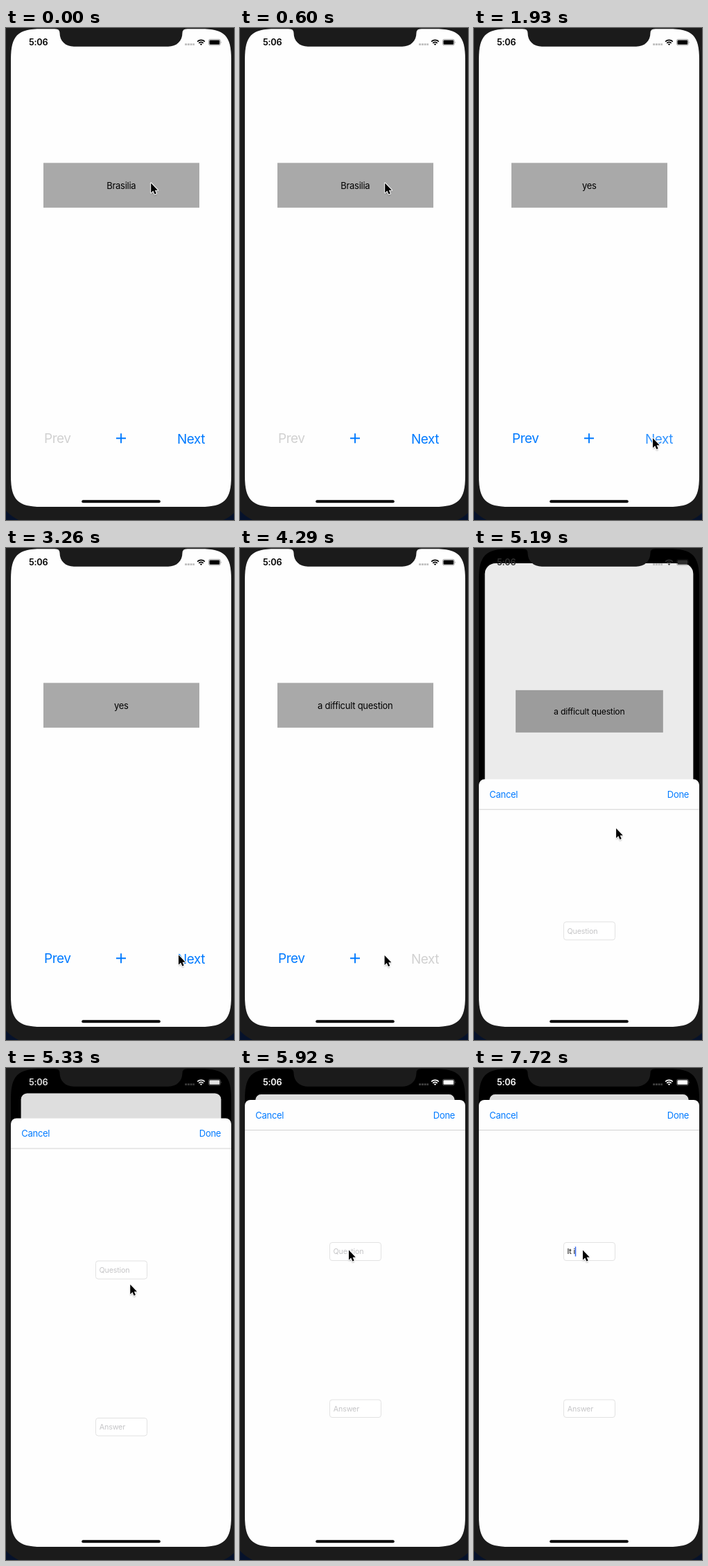
These frames come from a looping animation (329 by 709 pixels, 8 s). An HTML page:

```html
<!DOCTYPE html>
<html lang="en">
<head>
<meta charset="utf-8">
<title>Flashcards</title>
<style>
  html, body { margin: 0; width: 100%; height: 100%; overflow: hidden; background: #06122b; }
  svg { display: block; width: 329px; height: 709px; }
  text { font-family: Inter, Roboto, sans-serif; font-size: 13px; letter-spacing: -.02em; white-space: pre; }
  .mid { text-anchor: middle; }
  .btn { font-size: 19px; letter-spacing: -.5px; }
  .blue { fill: #007aff; }
  .field { font-size: 10.75px; letter-spacing: -.015em; }
  .box { fill: #fff; stroke: #e2e2e2; }
</style>
</head>
<body>
<svg viewBox="0 0 329 709">
  <defs>
    <clipPath id="screen">
      <path d="M7 45C7 11 17 1.300 51 1.300H281C315 1.300 325 11 325 45V646C325 680 315 690 281 690H51C17 690 7 680 7 646Z"/>
    </clipPath>
    <filter id="soft" x="-50%" y="-50%" width="200%" height="200%"><feGaussianBlur stdDeviation="1"/></filter>
    <path id="arrow" d="M0 0V14L3.200 11 5.400 16 7.700 15 5.600 10.200H9.800Z"/>
  </defs>
  <rect x="-12" y="-60" width="356" height="773" rx="50" fill="#1b1b1b"/>

  <g clip-path="url(#screen)">
    <rect width="329" height="709"/>
    <g id="page">
      <rect id="paper" x="7" y="1" width="318" height="689" fill="#fefefe"/>
      <rect id="card" x="54" y="194.400" width="225" height="64.500"/>
      <text id="label" class="mid" x="166.300" y="231.500"></text>
      <text id="prev" class="btn" x="55" y="598.200">Prev</text>
      <path id="plus" d="M159 591.300H173M166 584.300V598.300" stroke="#007aff" stroke-width="1.900"/>
      <text id="next" class="btn" x="247" y="599.200">Next</text>
      <rect id="dim" x="7" y="1" width="318" height="689"/>
    </g>
    <g id="sheet">
      <rect x="7" y="46" width="318" height="720" rx="8" fill="#fefefe"/>
      <path d="M7 89.500H325" stroke="#d2d2d2"/>
      <text class="blue" x="22.200" y="72.500">Cancel</text>
      <text class="blue" x="310.200" y="72.500" text-anchor="end">Done</text>
      <rect class="box" x="129.500" y="251.500" width="74" height="26" rx="3.500"/>
      <text id="entry" class="field" x="134.400" y="268.300"></text>
      <rect id="caret" y="257.500" width="1.500" height="14" fill="#3568f0"/>
      <rect class="box" x="129.500" y="478" width="74" height="25.500" rx="3.500"/>
      <text class="field" x="134.700" y="494.900" fill="#c5c5c7">Answer</text>
    </g>
  </g>

  <path d="M70 0V1Q77.500 1 77.500 7C77.500 19 86 26.700 98 26.700H234C246 26.700 254.500 19 254.500 7Q254.500 1 262 1V0Z" fill="#1b1b1b"/>
  <g id="status">
    <text x="33" y="25.100" font-weight="600" style="font-size: 12.700px">5:06</text>
    <path d="M258.200 23.600H272" stroke="currentColor" stroke-width="2.800" stroke-dasharray="2.900 .850" opacity=".25"/>
    <path d="M276.200 19.600A7.500 7.500 0 0 1 286.800 19.600M278.300 21.800A4.500 4.500 0 0 1 284.700 21.800"
      fill="none" stroke="currentColor" stroke-width="1.700"/>
    <path d="M279.800 23.300A2.400 2.400 0 0 1 283.200 23.300L281.500 25Z"/>
    <rect x="292.400" y="16.300" width="17" height="8.600" rx="2.300" fill="none" stroke="currentColor" stroke-width=".800" opacity=".4"/>
    <rect x="293.500" y="17.400" width="14.800" height="6.400" rx="1.300"/>
    <path d="M310.500 19.200Q311.800 20.600 310.500 22Z" opacity=".45"/>
  </g>
  <rect x="109.200" y="680.200" width="113.600" height="4" rx="2"/>
  <g id="cursor">
    <use href="#arrow" y="2" opacity=".4" filter="url(#soft)"/>
    <use href="#arrow" stroke="#fff" stroke-width="2" stroke-linejoin="round"/>
    <use href="#arrow"/>
  </g>
</svg>
<script>
// The screen refreshes in ticks; every time below is counted in them.
const LOOP = 8000, TICK = 148.2;
const FLIP = 1, FLIP_BACK = 4, NEXT_1 = 11, NEXT_2 = 24, ADD = 34, FOCUS = 44, TYPE = 50;
const BLUE = "#007aff", OFF = "#d1d1d1";

const $ = id => document.getElementById(id);
const set = (id, attrs) => { for (const k in attrs) $(id).setAttribute(k, attrs[k]); };

// Pointer strokes: each runs from the previous end to (x, y), bulging sideways by bend.
const strokes = [
  { from: 0, to: 1, x: 209.2, y: 223.5, bend: 0 },
  { from: 5.4, to: 9, x: 258, y: 591, bend: 6 },
  { from: 15.5, to: 19, x: 204.5, y: 215.5, bend: 0 },
  { from: 19, to: 22, x: 249, y: 586.5, bend: 0 },
  { from: 28.3, to: 33, x: 164, y: 587.5, bend: 0 },
  { from: ADD, to: ADD + 5.33, x: 157, y: 262.5, bend: 46 }
];

function pointer(k) {
  const i = strokes.findLastIndex(s => s.from <= k);
  const b = strokes[i], a = strokes[i - 1] || b;
  const s = Math.min(1, (k - b.from) / (b.to - b.from));
  const e = 1 - (1 - s) ** 4;
  return [a.x + (b.x - a.x) * e + b.bend * Math.sin(Math.PI * e), a.y + (b.y - a.y) * e];
}

// Critically damped spring, 0 to 1.
function spring(ticks) {
  const u = Math.max(0, ticks) * 3.112;
  return 1 - (1 + u) * Math.exp(-u);
}

function drawCard(k) {
  const asking = k >= FLIP && k < FLIP_BACK;
  $("label").textContent = asking ? "What is the capital of Brazil?"
    : k <= NEXT_1 ? "Brasilia"
    : k <= NEXT_2 ? "yes" : "a difficult question";
  set("card", { fill: asking ? "#cfcfcf" : "#a9a9a9" });

  const since = k - (k < NEXT_2 ? NEXT_1 : NEXT_2);
  const glow = since < 0 ? 1 : Math.min(1, .2 + .3 * since);
  set("prev", { fill: k > NEXT_1 ? BLUE : OFF });
  set("next", { fill: k > NEXT_2 ? OFF : BLUE, opacity: glow });
  set("plus", { opacity: k === ADD ? .2 : 1 });
}

function drawSheet(k) {
  const p = spring(k - ADD - .389);
  const rx = 26 - 17 * p;
  set("page", { transform: `translate(166 ${1 + 37 * p}) scale(${1 - .096 * p}) translate(-166 -1)` });
  set("paper", { rx });
  set("dim", { rx, opacity: .13 * p });
  set("sheet", { transform: `translate(0 ${663 * (1 - p)})` });
  const c = Math.round(255 * p ** 3), ink = `rgb(${c},${c},${c})`;
  set("status", { fill: ink, color: ink });
}

function drawEntry(k) {
  const word = "It i".slice(0, Math.max(0, k - TYPE + 2) * (k >= TYPE));
  $("entry").textContent = word || "Question";
  set("entry", { fill: word ? "#000" : "#c5c5c7" });
  const end = word ? $("entry").getComputedTextLength() : 0;
  const blink = k < FOCUS ? 0 : Math.max(0, Math.min(1, (FOCUS + 4 - k) / 2));
  set("caret", { x: 134.2 + end, opacity: word ? 1 : blink });
}

function draw(t) {
  const k = Math.floor((t + 10) / TICK);
  set("cursor", { transform: `translate(${pointer(k)})` });
  drawCard(k);
  drawSheet(k);
  drawEntry(k);
}

function frame() {
  draw(performance.now() % LOOP);
  requestAnimationFrame(frame);
}
frame();
</script>
</body>
</html>
```
